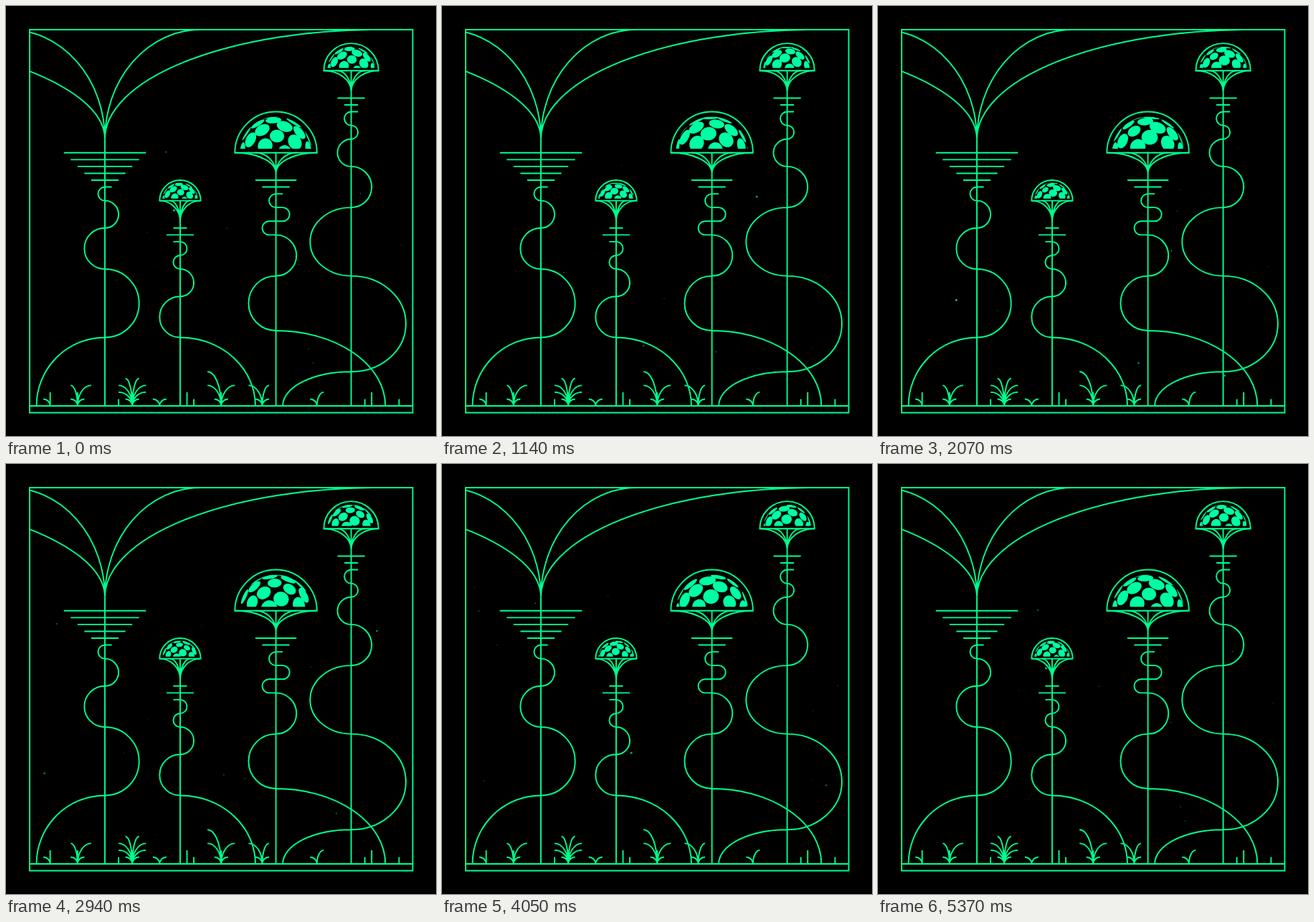
These frames come from a looping animation (600x600 px, 5.4 s). An HTML page:

```html
<!DOCTYPE html>
<html lang="en">
<head>
<meta charset="utf-8">
<title>Night garden</title>
<style>
  html, body { margin: 0; width: 100%; height: 100%; overflow: hidden; background: #000; }
  svg { display: block; width: 100%; height: 100%; }
</style>
</head>
<body>
<svg viewBox="0 0 600 600">
  <clipPath id="frame"><rect width="56" height="56"/></clipPath>
  <clipPath id="cap"><rect x="-1" y="-1" width="2" height=".89"/></clipPath>
  <g transform="translate(33 33) scale(9.545)">
    <g id="motes" fill="#00ff96"></g>
    <g id="lines" fill="none" stroke="#00ff8c" stroke-width=".2"></g>
    <g id="domes" fill="#00ffa2"></g>
  </g>
</svg>
<script>
const LOOP = 5400, STEP = 30, FRAMES = LOOP / STEP;
const GROUND = 55, TAU = Math.PI * 2, GOLDEN_ANGLE = Math.PI * (3 - Math.sqrt(5));
const [motesLayer, linesLayer, domesLayer] =
  ['motes', 'lines', 'domes'].map(id => document.getElementById(id));

let seed = 7;
const random = () => (seed = seed * 16807 % 2147483647) / 2147483647;
const between = (a, b) => a + (b - a) * random();
const range = n => Array.from({ length: n }, (_, i) => i);

function add(parent, tag, attrs) {
  const node = document.createElementNS('http://www.w3.org/2000/svg', tag);
  for (const key in attrs) node.setAttribute(key, attrs[key]);
  parent.appendChild(node);
  return node;
}
const draw = (d, attrs) => add(linesLayer, 'path', { d, ...attrs });

// Quarter ellipse from a flat tip down to an upright root at (x, y).
const sprout = (x, y, dx, dy) =>
  `M${x + dx} ${y - dy}A${Math.abs(dx)} ${dy} 0 0 ${dx < 0 ? 1 : 0} ${x} ${y}`;
const rungs = (x, y, first, last) =>
  range(Math.abs(last - first) + 1).map(i => {
    const half = first + i * Math.sign(last - first);
    return `M${x - half} ${y + i}h${2 * half}`;
  }).join('');

// Vine pieces: half turns and the last quarter turn to the ground.
const left = (rx, ry = rx) => `a${rx} ${ry} 0 0 0 0 ${2 * ry}`;
const right = (rx, ry = rx) => `a${rx} ${ry} 0 0 1 0 ${2 * ry}`;
const tail = (dx, dy) => `a${Math.abs(dx)} ${dy} 0 0 ${dx < 0 ? 0 : 1} ${dx} ${dy}`;

draw('M0 0H56V56H0ZM0 55H56');

// Open plant
draw([-51, -14, 14, 40].map(dx => sprout(11, 16, dx, 16)).join(''), { 'clip-path': 'url(#frame)' });
draw('M11 16V55' + rungs(11, 18, 6, 2) +
  'M12 23h-1' + left(1) + right(2) + left(3) + right(5) + tail(-10, 10));

// Domed plants
function domedPlant(x, y, r, details) {
  const funnel = [-1, -.5, .5, 1].map(k => sprout(x, y + 3, k * r, 3)).join('');
  draw(`M${x - r} ${y}a${r} ${r} 0 0 1 ${2 * r} 0Z`);
  draw(`M${x} ${y}V${GROUND}` + funnel + details);
  const cap = add(domesLayer, 'g', {
    transform: `translate(${x} ${y}) scale(${r * .88})`, 'clip-path': 'url(#cap)'
  });
  return add(cap, 'path', {});
}
const caps = [
  domedPlant(22, 25, 3, rungs(22, 29, 1, 2) + 'M21 31h1' +
    right(1) + left(1) + right(2) + left(3) + tail(11, 10)),
  domedPlant(36, 18, 6, rungs(36, 22, 3, 2) + 'M37 24h-1' +
    left(1) + 'h1' + right(1) + 'h-2' + left(1) + 'h1' + right(3) + left(4) + tail(16, 11)),
  domedPlant(47, 6, 4, rungs(47, 10, 2, 1) + 'M48 12h-1' +
    left(1) + right(1) + left(2) + right(3) + left(6, 5) + right(8, 7) + tail(-10, 5))
];

// Grass: blades on one side, from the tallest down.
function blades(x, dx, height, gap = 2) {
  let d = '';
  for (let h = height; h > 0; h -= gap) {
    d += sprout(x, GROUND, Math.sign(dx) * Math.min(Math.abs(dx), h), h);
  }
  return d;
}
const stalks = (height, ...xs) => xs.map(x => `M${x} ${GROUND}v${-height}`).join('');
draw(
  blades(3, -1, 1) +
  blades(7, -1, 3) + blades(7, 2, 3) +
  [-1, 1].map(side => blades(15, side, 4, 4) + blades(15, 2 * side, 3, 1) +
    blades(19, side, 1)).join('') +
  blades(28, -2, 5) + blades(28, 2, 3) +
  blades(34, -2, 3) + blades(34, 1, 3) +
  blades(42, -1, 1) + blades(42, 1, 2) +
  stalks(2, 3, 7, 15, 23, 28, 50) + stalks(1, 13, 24, 49, 54)
);

// Spots spread evenly over the upper half of a turning sphere
const SPOTS = 29;
const spots = range(SPOTS).map(i => ({
  lon: i * GOLDEN_ANGLE + .25,
  lat: Math.asin((i + .7) / SPOTS),
  size: between(.19, .24)
}));

function spotPath({ lon, lat, size }, turn) {
  const a = lon + turn;
  const sa = Math.sin(a), ca = Math.cos(a), sl = Math.sin(lat), cl = Math.cos(lat);
  if (cl * ca < -.05) return '';
  const points = range(18).map(i => {
    const q = i / 18 * TAU;
    const u = Math.sin(size) * Math.cos(q), v = Math.sin(size) * Math.sin(q), w = Math.cos(size);
    const x = w * cl * sa + u * ca - v * sl * sa;
    const y = -(w * sl + v * cl);
    const z = w * cl * ca - u * sa - v * sl * ca;
    const n = z < 0 ? Math.hypot(x, y) : 1;
    return (x / n).toFixed(3) + ' ' + (y / n).toFixed(3);
  });
  return 'M' + points.join('L') + 'Z';
}

// Motes drift a little while they glow up and fade
const motes = range(56).map(i => {
  const glow = random();
  return {
    peak: i / 56, glow: .2 + .8 * glow,
    x: between(1, 55), y: between(14, 51),
    dx: between(-2, 2), dy: between(-2, 2),
    node: add(motesLayer, 'circle', { r: .07 + .1 * glow ** 4 })
  };
});

function render(time) {
  const phase = Math.floor(time % LOOP / STEP) / (FRAMES - 1);
  const d = spots.map(spot => spotPath(spot, phase * TAU)).join('');
  caps.forEach(cap => cap.setAttribute('d', d));
  for (const m of motes) {
    const age = phase - m.peak - Math.round(phase - m.peak);
    const drift = Math.sin(age * TAU);
    m.node.setAttribute('cx', m.x + m.dx * drift);
    m.node.setAttribute('cy', m.y + m.dy * drift);
    m.node.setAttribute('opacity', m.glow * Math.max(0, 1 - Math.abs(age) / .15));
  }
}

const start = performance.now();
function tick() {
  render(performance.now() - start);
  requestAnimationFrame(tick);
}
render(0);
requestAnimationFrame(tick);
</script>
</body>
</html>
```
